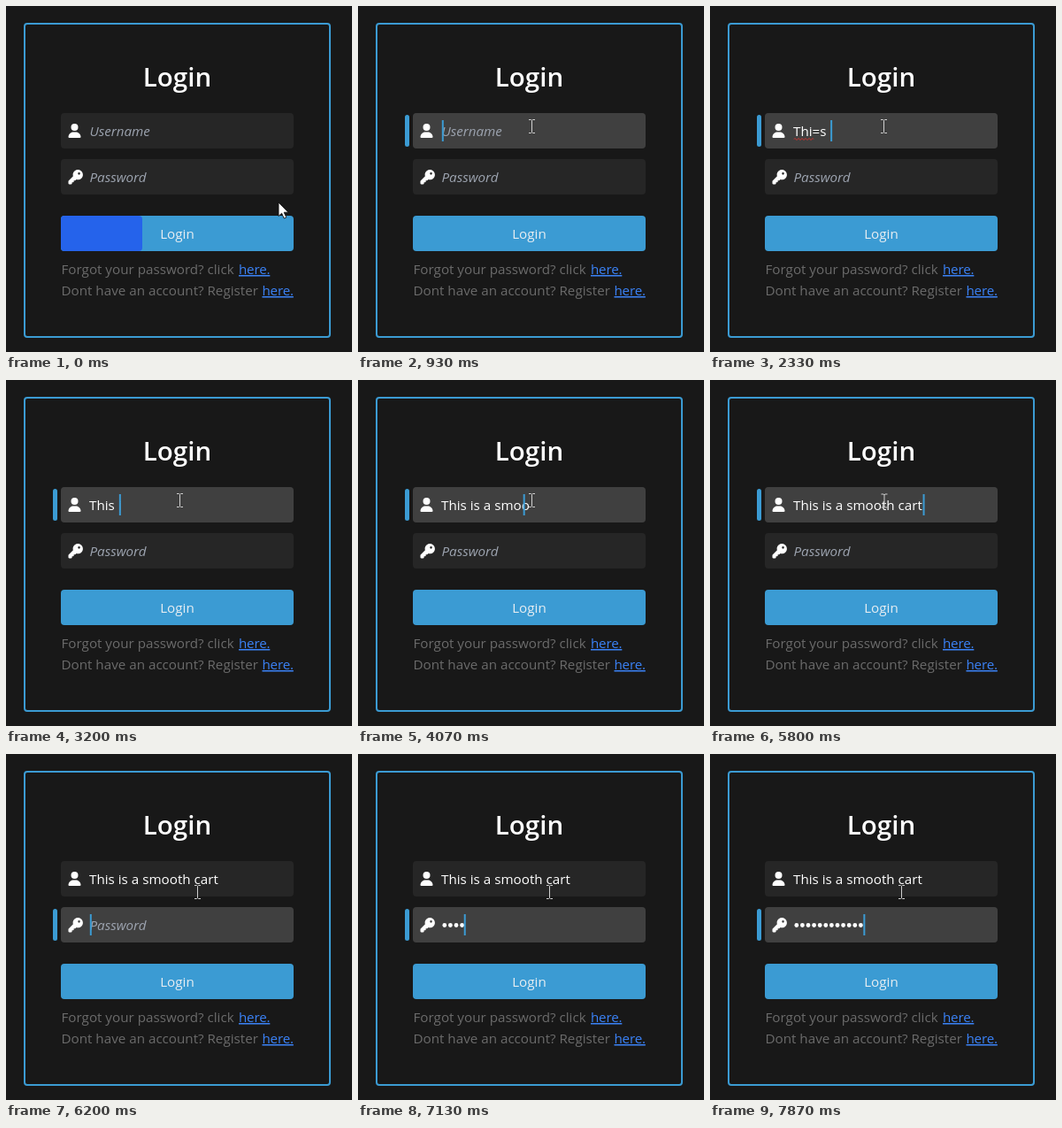
Recreate the animation shown at these times as an HTML page. Size 391x391 px, loop 8 s.

```html
<!DOCTYPE html>
<html lang="en">
<head>
<meta charset="utf-8">
<title>Login form with a smooth caret</title>
<style>
  html, body { margin: 0; width: 100%; height: 100%; overflow: hidden; background: #181818; }
  svg { display: block; width: 391px; height: 391px; font: 15.2px "Open Sans", "Noto Sans", sans-serif; }
  text { white-space: pre; }
  .title { font-size: 29.5px; font-weight: 600; }
  .white { fill: #fff; }
  .accent { fill: #3b9bd3; }
  .hint { fill: #9ca3af; font-style: italic; }
  .note { fill: #6b6b6b; }
  .link { fill: #3b82f6; text-decoration: underline; letter-spacing: -.2px; }
  .mid { text-anchor: middle; }
</style>
</head>
<body>
<svg viewBox="0 0 391 391">
  <rect x="21" y="20" width="345" height="354" rx="3" fill="none" stroke="#3b9bd3" stroke-width="2"/>
  <text class="title white mid" x="193.5" y="91">Login</text>

  <rect id="box0" x="62" y="121" width="263" height="40" rx="4"/>
  <rect id="box1" x="62" y="173" width="263" height="40" rx="4"/>
  <rect id="bar0" class="accent" x="53" width="5" rx="2.5"/>
  <rect id="bar1" class="accent" x="53" width="5" rx="2.5"/>

  <g class="white" transform="translate(70.5 133) scale(.03125)">
    <circle cx="224" cy="128" r="128"/>
    <path d="M178 304C80 304 0 384 0 482c0 16 14 30 30 30h388c16 0 30-14 30-30 0-98-80-178-178-178z"/>
  </g>
  <path class="white" fill-rule="evenodd" transform="translate(70.5 185) scale(.032)"
    d="M336 352c97 0 176-79 176-176S433 0 336 0 160 79 160 176c0 19 3 37 9 54L7 391c-5 5-7 11-7 17v80c0 13 11 24 24 24h80c13 0 24-11 24-24v-40h40c13 0 24-11 24-24v-40h40c6 0 13-3 17-7l33-33c17 5 35 9 54 9zM376 96a40 40 0 1 1 0 80 40 40 0 1 1 0-80z"/>

  <text id="hint0" class="hint" x="94.5" y="147">Username</text>
  <text id="hint1" class="hint" x="94.5" y="199">Password</text>
  <text id="name" class="white" x="94" y="147"></text>
  <path id="squiggle" fill="none" stroke="#e0302d"/>
  <g id="dots" class="white"></g>
  <rect id="caret" class="accent" width="2" height="24"/>

  <rect class="accent" x="62" y="237" width="263" height="40" rx="4"/>
  <rect id="fill" x="62" y="237" height="40" rx="4" fill="#2563eb"/>
  <text class="mid" x="193.5" y="263" fill="#e8eef2">Login</text>

  <text class="note" x="62.5" y="303">Forgot your password? click</text>
  <text class="link" x="263" y="303">here.</text>
  <text class="note" x="62.5" y="327">Dont have an account? Register</text>
  <text class="link" x="289.5" y="327">here.</text>

  <path id="arrow" d="M0 0V15.5L3.6 12.2 6.2 18 8.8 16.8 6.2 11.2H11Z" fill="#fff" stroke="#111" stroke-width=".9"/>
  <path id="beam" d="M-3.5 -7.5H-1L0 -6.7 1 -7.5H3.5M0 -6.7V6.7M-3.5 7.5H-1L0 6.7 1 7.5H3.5" fill="none" stroke="#d0d0d0" stroke-width="1"/>
</svg>
<script>
const LOOP = 8000, STEP = 1000 / 15, GLIDE = 120, DOT = 6.6, DOTS = 12;
const FOCUS_NAME = 700, FOCUS_PASS = 5840, FADE = 210;

// Key and time; "<" is backspace.
const keys = [
  ["T", 1370], ["h", 1500], ["i", 1650], ["=", 2090], ["s", 2160], [" ", 2225], ["i", 2400],
  ["<", 2520], ["<", 2620], ["<", 2710], ["<", 2800],
  ["s", 2970], [" ", 3080], ["i", 3180], ["s", 3280], [" ", 3380], ["a", 3490], [" ", 3590],
  ["s", 3690], ["m", 3780], ["o", 3910], ["o", 4040], ["t", 4190], ["h", 4330], [" ", 4470],
  ["c", 4840], ["a", 4928], ["r", 5120], ["t", 5410]
];

const $ = id => document.getElementById(id);
const set = (id, attrs) => { for (const k in attrs) $(id).setAttribute(k, attrs[k]); };
const show = (id, on) => set(id, { visibility: on ? "visible" : "hidden" });
const ramp = (t, start, length) => Math.min(1, Math.max(0, (t - start) / length));
const smooth = p => p * p * (3 - 2 * p);
const easeOut = p => 1 - (1 - p) ** 2;

const pen = document.createElement("canvas").getContext("2d");
pen.font = '15.2px "Open Sans", "Noto Sans", sans-serif';

let typed = "", width = 0;
const strokes = keys.map(([key, at]) => {
  typed = key === "<" ? typed.slice(0, -1) : typed + key;
  const next = pen.measureText(typed).width, move = next - width;
  width = next;
  return { at, text: typed, move };
});
const dotStrokes = Array.from({ length: DOTS }, (_, i) => ({ at: 6780 + i * 90, move: DOT }));

$("dots").innerHTML = dotStrokes.map((_, i) =>
  `<circle cx="${97.8 + i * DOT}" cy="193.5" r="2.4"/>`).join("");
set("squiggle", { d: "M95 150.5q1 -2 2 0" + "t2 0".repeat(10) });

// Each key press slides the caret by its own eased distance.
const glide = (list, t) =>
  list.reduce((x, s) => x + s.move * smooth(ramp(t, s.at, GLIDE)), 94.8);

function drawField(i, focus) {
  const shade = Math.round(38 + 26 * focus), height = 36 * focus;
  set("box" + i, { fill: `rgb(${shade},${shade},${shade})` });
  set("bar" + i, { y: 141 + 52 * i - height / 2, height, opacity: focus });
}

function drawPointer(t) {
  const a = easeOut(ramp(t, 10, 455)), b = smooth(ramp(t, 5760, 430));
  const x = 308 - 111.5 * a + 20 * b, y = 222 - 86 * a + 20 * b;
  const inField = x > 62 && x < 325 && (y > 121 && y < 161 || y > 173 && y < 213);
  show("beam", inField);
  show("arrow", !inField);
  set(inField ? "beam" : "arrow", { transform: `translate(${x} ${y})` });
}

function draw(t) {
  const inPass = t >= FOCUS_PASS;
  const pass = smooth(ramp(t, FOCUS_PASS, FADE));
  drawField(0, smooth(ramp(t, FOCUS_NAME, FADE)) * (1 - pass));
  drawField(1, pass);

  const last = strokes.filter(s => s.at <= t).pop();
  $("name").textContent = last ? last.text : "";
  show("hint0", !last);
  show("squiggle", t >= 2150 && t < 2800);

  const count = dotStrokes.filter(s => s.at <= t).length;
  [...$("dots").children].forEach((dot, i) => dot.setAttribute("opacity", i < count ? 1 : 0));
  show("hint1", !count);

  show("caret", t >= FOCUS_NAME);
  set("caret", { x: glide(inPass ? dotStrokes : strokes, t), y: inPass ? 181 : 129 });

  const left = 92 * (1 - ramp(t, 0, 290)) ** 2;
  set("fill", { width: left });
  drawPointer(t);
}

const start = performance.now();
function tick() {
  const t = (performance.now() - start) % LOOP;
  draw(Math.floor((t + 4) / STEP) * STEP);
  requestAnimationFrame(tick);
}
tick();
</script>
</body>
</html>
```
